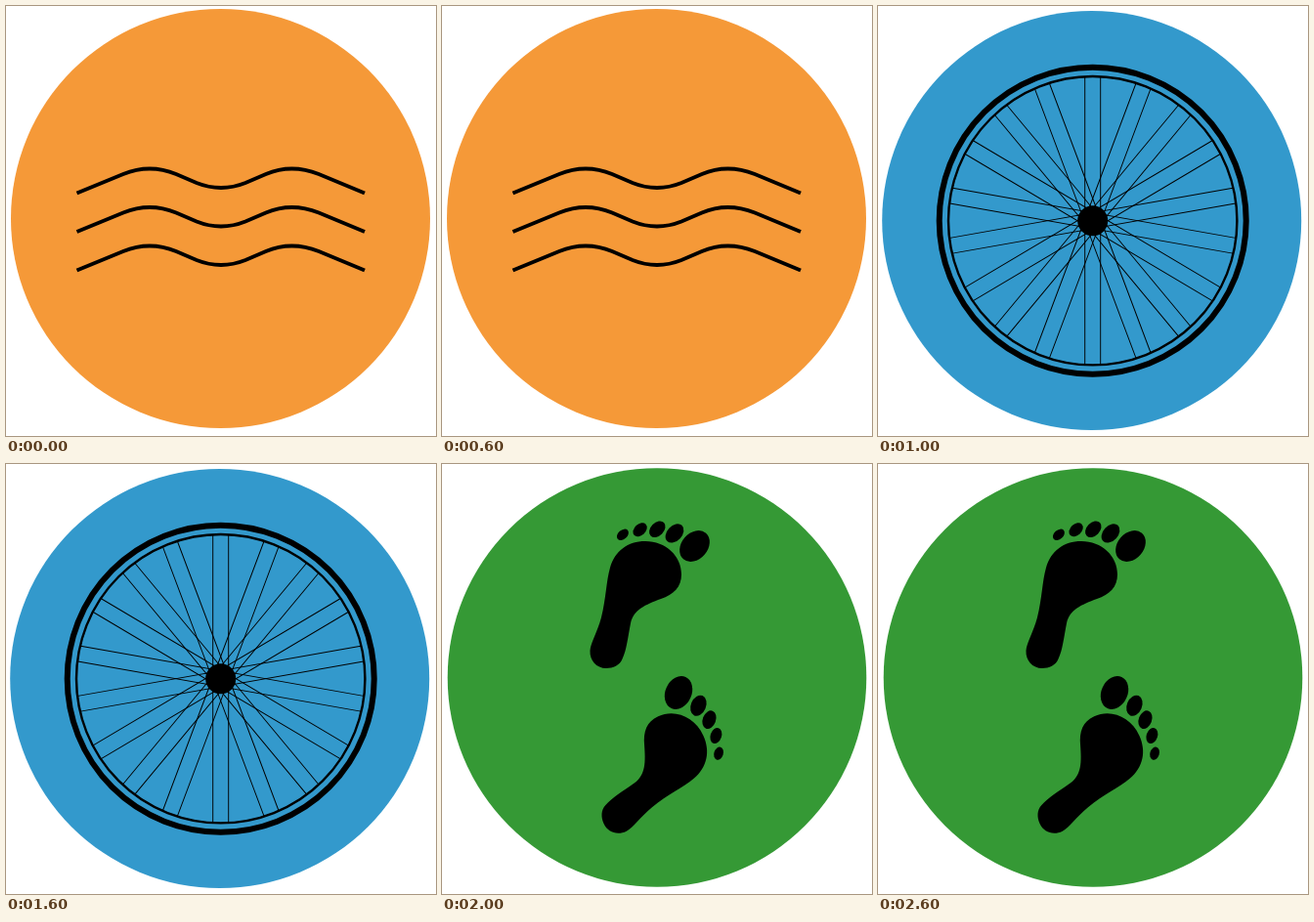
These frames come from a looping animation (440 by 440 pixels, 3 s). An HTML page:

```html
<!DOCTYPE html>
<html lang="en">
<head>
<meta charset="utf-8">
<title>Swim, bike, walk</title>
<style>
  html, body { margin: 0; width: 100%; height: 100%; overflow: hidden; background: #fff; }
  svg { display: block; width: 440px; height: 440px; }
  .line { fill: none; stroke: #000; }
</style>
</head>
<body>
<svg viewBox="0 0 440 440">
  <defs>
    <path id="wave" class="line" stroke-width="4"
      d="M72.5 191.5L120 172Q147 161 174 172L195 181Q220 191 245 181L266 172Q292 161 320 172L367 191.5"/>
    <!-- The big toe sits at the origin -->
    <g id="foot">
      <path d="M-50.5-5C-29.5-5-13.5 10-13.5 29C-13.5 42-21.5 49.5-34.5 54C-50.5 60-62.5 65-65.5 79
        C-68.5 94-69.5 106-74 115.5C-76.5 122-83.5 125-90.5 125C-100.5 125-107.5 117-107 107
        C-106.5 99-99.5 88-95.5 73C-90.5 53-90.5 36-86.5 22C-81.5 5-68.5-5-50.5-5Z"/>
      <ellipse rx="13.4" ry="17.6" transform="rotate(41)"/>
    </g>
  </defs>

  <g class="scene">
    <circle cx="219.5" cy="217.5" r="214.5" fill="#f59938"/>
    <use href="#wave"/>
    <use href="#wave" y="39.5"/>
    <use href="#wave" y="79"/>
  </g>

  <g class="scene" visibility="hidden">
    <circle cx="218.7" cy="219.5" r="214.5" fill="#3399cc"/>
    <g id="wheel" class="line" transform="translate(219.7 219.7)">
      <circle r="157" stroke-width="6"/>
      <circle r="147.7" stroke-width="2.4"/>
      <circle r="15.5" fill="#000" stroke="none"/>
    </g>
  </g>

  <g class="scene" visibility="hidden">
    <circle cx="220" cy="218.5" r="214.3" fill="#359935"/>
    <use href="#foot" transform="translate(258.5 84)"/>
    <use href="#foot" transform="translate(242 234) rotate(65.6) scale(-1 1)"/>
  </g>
</svg>
<script>
const SCENE_MS = 1000;
const scenes = [...document.querySelectorAll('.scene')];

function add(parentId, tag, attrs) {
  const el = document.createElementNS('http://www.w3.org/2000/svg', tag);
  for (const name in attrs) el.setAttribute(name, attrs[name]);
  document.getElementById(parentId).append(el);
}

// Pairs of parallel spokes, mirrored left and right
for (const tilt of [0, 20.6, 39.7, 59.3, 80]) {
  for (const angle of new Set([tilt, -tilt])) {
    add('wheel', 'path', { d: 'M-8-147V147M8-147V147', 'stroke-width': 0.95, transform: `rotate(${angle})` });
  }
}

// Four small toes shrink along a shallow arc
for (let i = 0; i < 4; i++) {
  const x = -20.5 - 17.7 * i;
  const y = 2.3 * (i - 1.4) ** 2 - 17.6;
  add('foot', 'ellipse', { rx: 7.7 - i, ry: 11 - 1.4 * i, transform: `translate(${x} ${y}) rotate(${43 + 2 * i})` });
}

const start = performance.now();
function draw() {
  const current = Math.floor((performance.now() - start) / SCENE_MS) % scenes.length;
  scenes.forEach((scene, i) => scene.setAttribute('visibility', i === current ? 'visible' : 'hidden'));
  requestAnimationFrame(draw);
}
draw();
</script>
</body>
</html>
```
